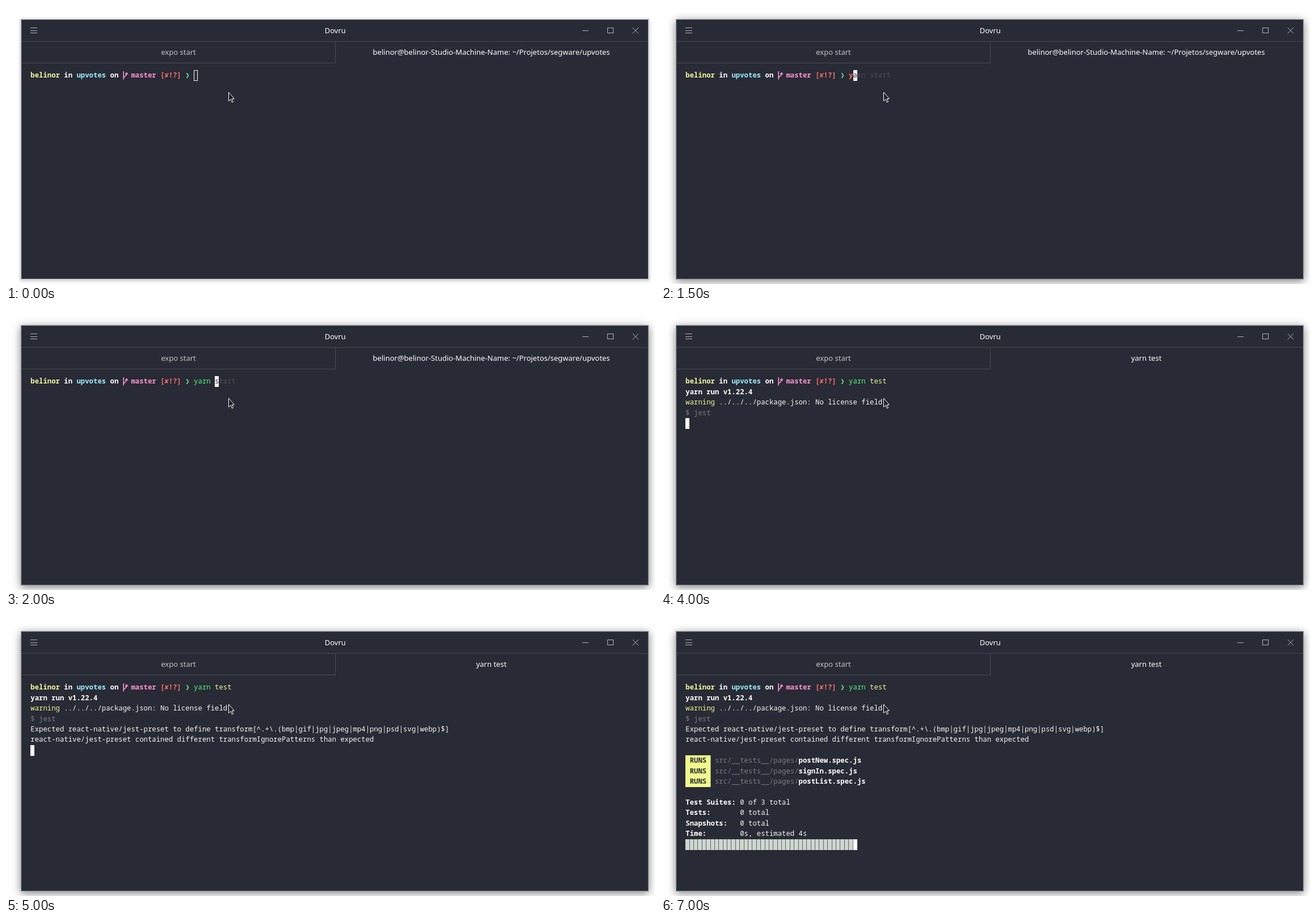
These frames come from a looping animation (1144x490 px, 8 s). An HTML page with a canvas:

```html
<!DOCTYPE html>
<html lang="en">
<head>
<meta charset="utf-8">
<title>Terminal test run</title>
<style>
html, body { margin: 0; width: 100%; height: 100%; overflow: hidden; background: #fff; }
canvas { display: block; }
</style>
</head>
<body>
<canvas id="stage" width="1144" height="490"></canvas>
<script>
const ctx = document.getElementById('stage').getContext('2d');
const LOOP = 8000;
const LEFT = 43.3, TOP = 113.2, CELL_W = 7.38, CELL_H = 18.43;
const USER = 'belinor';
const C = {
  bg: '#282a35', line: '#484a54', icon: '#b4b5b9', text: '#f8f8f2', white: '#fff',
  yellow: '#f1fa8c', brightYellow: '#f4f99d', cyan: '#9aedfe', pink: '#ff92d0',
  red: '#ff6e67', green: '#50fa7b', brightGreen: '#5af78e', dim: '#7b7c80',
  hint: '#4d4e54', bar: '#d0d6cd', seam: '#4c6a72'
};

// Command line typing: [time, typed text, suggested rest]
const typing = [
  [0, '', ''],
  [1500, 'y', 'arn start'],
  [1600, 'ya', 'rn start'],
  [1700, 'yar', 'n start'],
  [1800, 'yarn', ' start'],
  [2000, 'yarn ', 'start'],
  [2400, 'yarn te', 'st'],
  [2700, 'yarn tes', 't'],
  [2800, 'yarn test', '']
];

const colX = col => LEFT + col * CELL_W;
const rowY = row => TOP + row * CELL_H;

function rect(x, y, w, h, color) {
  ctx.fillStyle = color;
  ctx.fillRect(x, y, w, h);
}

function stroke(color, width, ...lines) {
  ctx.strokeStyle = color;
  ctx.lineWidth = width;
  ctx.beginPath();
  for (const [x1, y1, x2, y2] of lines) {
    ctx.moveTo(x1, y1);
    ctx.lineTo(x2, y2);
  }
  ctx.stroke();
}

function label(text, x, y, color) {
  ctx.font = '13px "Noto Sans", "Open Sans", sans-serif';
  ctx.textAlign = 'center';
  ctx.fillStyle = color;
  ctx.fillText(text, x, y);
}

function print(row, col, text, color = C.text, bold = false) {
  ctx.font = `${bold ? 'bold ' : ''}12.3px "Noto Sans Mono", "DejaVu Sans Mono", monospace`;
  ctx.textAlign = 'left';
  ctx.fillStyle = color;
  const baseline = Math.round(rowY(row) + 13.1);
  [...text].forEach((ch, i) => ctx.fillText(ch, colX(col + i), baseline));
}

function caret(row, col, under = '') {
  rect(Math.round(colX(col)), Math.round(rowY(row)), 7, 19, C.white);
  print(row, col, under, C.bg);
}

function drawWindow(focused, tabTitle) {
  rect(0, 0, 1144, 490, '#fff');
  const spread = focused ? 1 : 2;
  ctx.save();
  ctx.shadowColor = `rgba(0,0,0,${focused ? 0.5 : 0.2})`;
  ctx.shadowBlur = focused ? 9 : 6;
  ctx.shadowOffsetY = focused ? 3 : 2;
  if (focused) {
    ctx.shadowBlur = 14;
  }
  rect(27 - spread, 24 - spread, 1105 + 2 * spread, 457 + 2 * spread, '#000');
  ctx.restore();
  // Only the shadow may show outside the frame edge
  ctx.strokeStyle = focused ? '#9b9b9f' : '#d2d2d4';
  ctx.lineWidth = spread;
  ctx.strokeRect(27 - spread / 2, 24 - spread / 2, 1105 + spread, 457 + spread);
  rect(27, 24, 1105, 457, C.bg);
  ctx.strokeStyle = '#3b3d47';
  ctx.lineWidth = 1;
  ctx.strokeRect(27.5, 24.5, 1104, 456);

  stroke(C.line, 1, [27, 62.5, 1132, 62.5], [27, 100.5, 581, 100.5], [580.5, 62, 580.5, 101]);
  stroke(C.icon, 1, [43, 38.5, 55, 38.5], [43, 43.5, 55, 43.5], [43, 47.5, 55, 47.5],
    [1016, 43.5, 1027, 43.5], [1104.5, 38, 1115, 48.5], [1115, 38, 1104.5, 48.5]);
  ctx.strokeRect(1060.5, 38.5, 10, 9);

  label('Dovru', 580.3, 48, C.white);
  label('expo start', 304, 86, '#c3c4c7');
  label(tabTitle, 855.5, 86, C.white);
}

function drawBranch() {
  stroke(C.pink, 1.6, [207.2, 115, 207.2, 129.5]);
  ctx.beginPath();
  ctx.moveTo(207.2, 127);
  ctx.bezierCurveTo(207.2, 123.5, 212.5, 125, 212.5, 119);
  ctx.stroke();
  ctx.fillStyle = C.pink;
  ctx.beginPath();
  ctx.moveTo(209.2, 120.5);
  ctx.lineTo(212.5, 116.5);
  ctx.lineTo(215.8, 120.5);
  ctx.fill();
}

function drawPrompt() {
  print(0, 0, USER, C.brightYellow, true);
  print(0, 8, 'in', C.white, true);
  print(0, 11, 'upvotes', C.cyan, true);
  print(0, 19, 'on', C.white, true);
  drawBranch();
  print(0, 24, 'master', C.pink, true);
  print(0, 31, '[✘!?]', C.red, true);
  print(0, 37, '❯', C.brightGreen, true);
}

function drawCommand(t) {
  const [, typed, rest] = typing.findLast(step => t >= step[0]);
  const known = typed.length >= 4;
  print(0, 39, typed.slice(0, 4), known ? C.green : C.red, !known);
  print(0, 43, typed.slice(4), C.yellow);
  const end = 39 + typed.length;
  print(0, end + 1, rest.slice(1), C.hint);
  if (t < 500) {
    ctx.strokeStyle = C.white;
    ctx.lineWidth = 1;
    ctx.strokeRect(331.5, 113.5, 6, 18);
  } else if (t < 3300) {
    caret(0, end, rest[0]);
  }
}

function drawSummary(row) {
  const lines = [
    ['Test Suites:', '0 of 3 total'],
    ['Tests:', '0 total'],
    ['Snapshots:', '0 total'],
    ['Time:', '0s, estimated 4s']
  ];
  lines.forEach(([name, value], i) => {
    print(row + i, 0, name, C.white, true);
    print(row + i, 13, value);
  });
  const y = Math.round(rowY(row + 4));
  rect(43, y, colX(40) - 43, 19, C.bar);
  for (let i = 1; i < 40; i++) rect(Math.round(colX(i)) - 1, y, 1, 19, C.seam);
  caret(row + 4, 40);
}

function drawRuns() {
  rect(43, 242, 44.5, 56, C.yellow);
  ['postNew', 'signIn', 'postList'].forEach((name, i) => {
    print(7 + i, 1, 'RUNS', C.bg, true);
    print(7 + i, 7, 'src/__tests__/pages/', C.dim);
    print(7 + i, 27, name + '.spec.js', C.white, true);
  });
}

function drawOutput(t) {
  if (t < 4000) return caret(1, 0);
  print(1, 0, 'yarn run v1.22.4', C.white, true);
  print(2, 0, 'warning', C.yellow);
  print(2, 8, '../../../package.json: No license field');
  print(3, 0, '$ jest', C.dim);
  if (t < 5000) return caret(4, 0);
  print(4, 0, 'Expected react-native/jest-preset to define transform[^.+\\.(bmp|gif|jpg|jpeg|mp4|png|psd|svg|webp)$]');
  print(5, 0, 'react-native/jest-preset contained different transformIgnorePatterns than expected');
  if (t < 6900) return caret(6, 0);
  if (t >= 7000) drawRuns();
  drawSummary(t < 7000 ? 8 : 11);
}

function drawPointer() {
  const arrow = new Path2D('M392.5 152V167.5L396 164.3L398.4 169.8L400.6 168.8L398.2 163.5H402.3Z');
  ctx.fillStyle = '#1c1d24';
  ctx.fill(arrow);
  ctx.strokeStyle = C.white;
  ctx.lineWidth = 1;
  ctx.stroke(arrow);
}

function frame(now) {
  const t = now % LOOP;
  const running = t >= 3300;
  drawWindow(t >= 500, running ? 'yarn test' : `${USER}@${USER}-Studio-Machine-Name: ~/Projetos/segware/upvotes`);
  drawPrompt();
  drawCommand(t);
  if (running) drawOutput(t);
  drawPointer();
  requestAnimationFrame(frame);
}
requestAnimationFrame(frame);
</script>
</body>
</html>
```
